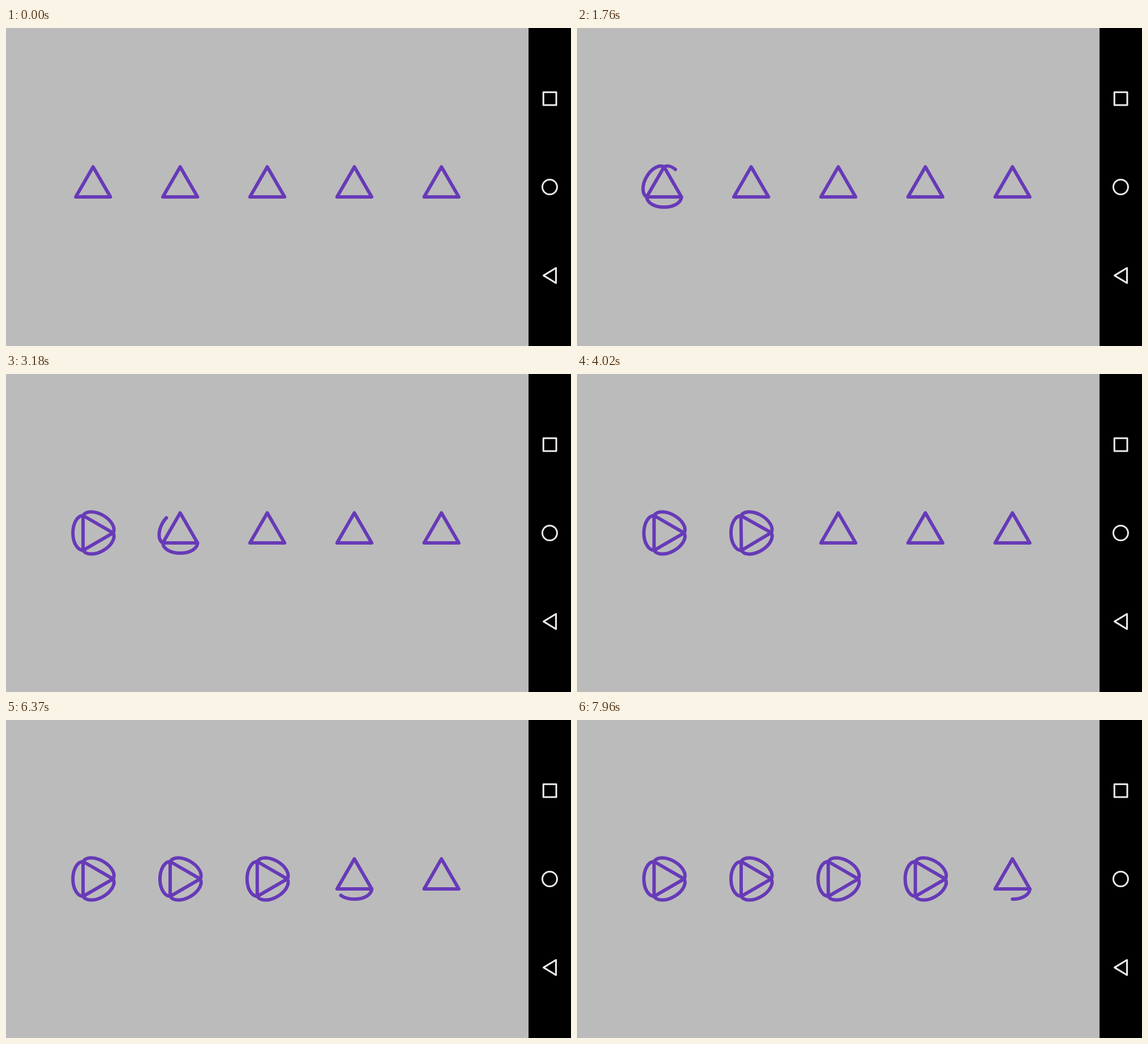
An HTML page with a canvas for the animation above (8 s loop, 998 by 561 pixels).

```html
<!DOCTYPE html>
<html lang="en">
<head>
<meta charset="utf-8">
<title>Triangle to play button</title>
<style>
  html, body { margin: 0; width: 100%; height: 100%; overflow: hidden; background: #000; }
  canvas { display: block; width: 998px; height: 561px; }
</style>
</head>
<body>
<canvas id="stage" width="998" height="561"></canvas>
<script>
const ctx = document.getElementById('stage').getContext('2d');
const LOOP = 8000;
const STEP = LOOP / 191;             // time between picture updates, about 24 per second
const PHASE = 356;                   // duration of each arc and of the final turn
const STARTS = [950, 2600, 4278, 6074, 7781];
const SCREEN_WIDTH = 923;
const MID_Y = 280.4;
const RADIUS = 35.4;                 // centre of the triangle to a corner
const HALF_SIDE = RADIUS * Math.sqrt(3) / 2;
const BULGE = 18;
const ARC_LENGTH = 77.7;             // half the ellipse HALF_SIDE x BULGE
const clamp = (value, low, high) => Math.min(high, Math.max(low, value));

function polygon(...points) {
  ctx.beginPath();
  points.forEach(([x, y]) => ctx.lineTo(x, y));
  ctx.closePath();
  ctx.stroke();
}

function drawNavigation() {
  ctx.fillStyle = '#000';
  ctx.fillRect(SCREEN_WIDTH, 0, 998 - SCREEN_WIDTH, 561);
  ctx.strokeStyle = '#eee';
  ctx.lineWidth = 3;
  ctx.strokeRect(949.2, 113.2, 22.8, 22.8);
  ctx.beginPath();
  ctx.arc(960.4, 280.5, 13, 0, 2 * Math.PI);
  ctx.stroke();
  polygon([971.5, 423.3], [971.5, 450], [949.5, 436.6]);
}

function drawButton(x, progress) {
  const arcs = clamp(progress, 0, 3);
  const turn = clamp(progress - 3, 0, 1);
  ctx.save();
  ctx.translate(x, MID_Y);
  ctx.rotate(turn * Math.PI / 2);
  ctx.strokeStyle = '#673ab7';
  ctx.lineWidth = 6;
  polygon([0, -RADIUS], [HALF_SIDE, RADIUS / 2], [-HALF_SIDE, RADIUS / 2]);

  if (arcs > 0) {
    ctx.beginPath();
    for (let side = 0; side < 3; side++) {
      ctx.ellipse(0, RADIUS / 2, HALF_SIDE, BULGE, 0, 0, Math.PI);
      ctx.rotate(2 * Math.PI / 3);
    }
    if (arcs < 3) ctx.setLineDash([arcs * ARC_LENGTH, 4 * ARC_LENGTH]);
    ctx.stroke();
  }
  ctx.restore();
}

function draw(now) {
  const time = Math.floor((now % LOOP + 5) / STEP) * STEP % LOOP;
  ctx.lineCap = ctx.lineJoin = 'round';
  ctx.fillStyle = '#bbbbbc';
  ctx.fillRect(0, 0, SCREEN_WIDTH, 561);
  drawNavigation();
  STARTS.forEach((start, i) =>
    drawButton(SCREEN_WIDTH / 6 * (i + 1), (time - start) / PHASE));
}

const origin = performance.now();
function frame() {
  draw(performance.now() - origin);
  requestAnimationFrame(frame);
}
frame();
</script>
</body>
</html>
```
